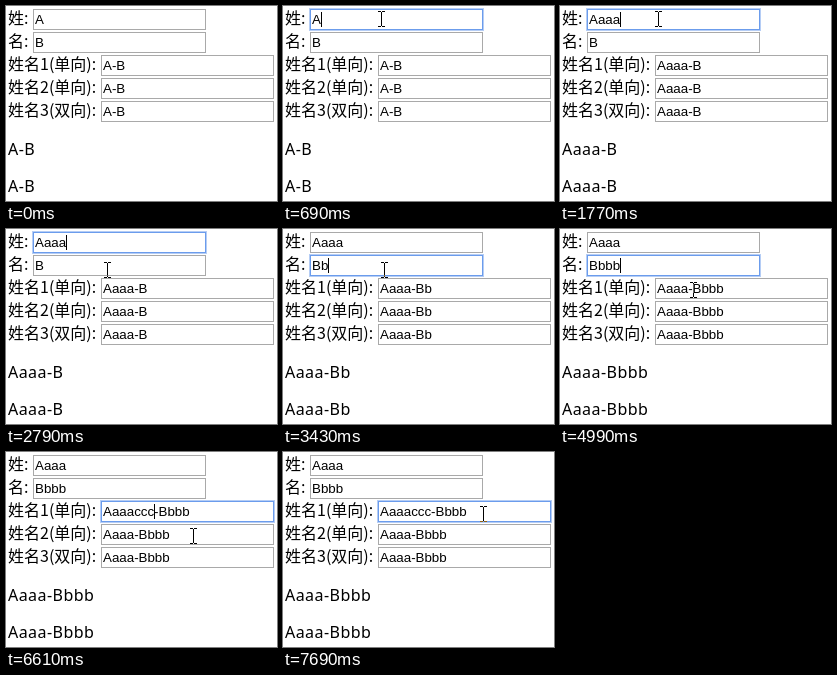
Write an HTML page with a canvas that moves like this. It is 271 px wide and 195 px high and loops after 8 s.

```html
<!DOCTYPE html>
<html lang="zh">
<head>
<meta charset="utf-8">
<title>姓名绑定</title>
<style>
html, body { margin: 0; width: 100%; height: 100%; overflow: hidden; background: #fff; }
canvas { display: block; }
</style>
</head>
<body>
<canvas id="stage" width="271" height="195"></canvas>
<script>
const ctx = document.getElementById('stage').getContext('2d', { alpha: false });
const LOOP = 8000;
const BLINK = 510;
const TICK = 78;
const LABEL_FONT = '16px "Noto Sans CJK SC", "Noto Sans CJK", sans-serif';
const BODY_FONT = '16px "Noto Sans", "Open Sans", sans-serif';
const INPUT_FONT = '13.333px "Liberation Sans", Arial, sans-serif';

const labels = ['姓:', '名:', '姓名1(单向):', '姓名2(单向):', '姓名3(双向):'];
const rows = labels.map((label, i) => ({ label, x: i < 2 ? 27 : 95, y: 3 + 23 * i }));

// Each session clicks into a row, then types one letter three times
const sessions = [
  { click: 690, type: 1240, gap: 265, letter: 'a' },
  { click: 2960, type: 3430, gap: 230, letter: 'b' },
  { click: 5380, type: 5690, gap: 235, letter: 'c' }
];
const END_CLICK = 7160;

// The pointer rests at each stop until the next one starts
const pointerStart = { x: 172, y: 133 };
const pointerStops = [
  { at: 70, steps: 5, x: 98, y: 5 },
  { at: 2480, steps: 3, x: 101, y: 33 },
  { at: 4200, steps: 3, x: 133, y: 53 },
  { at: 6140, steps: 6, x: 187, y: 76 },
  { at: 6612, steps: 4, x: 206, y: 49 },
  { at: 6925, steps: 3, x: 200, y: 54 }
];

const typedCount = (s, t) => Math.max(0, Math.min(3, Math.floor((t - s.type) / s.gap) + 1));
const typedText = (s, t) => s.letter.repeat(typedCount(s, t));

function write(text, x, y, font, spacing = 0) {
  ctx.font = font;
  ctx.letterSpacing = spacing + 'px';
  ctx.fillStyle = '#000';
  ctx.fillText(text, x, y);
}

function frame(x, y, w, h, color) {
  ctx.lineWidth = 1;
  ctx.strokeStyle = color;
  ctx.strokeRect(x + 0.5, y + 0.5, w - 1, h - 1);
}

function drawField({ label, x, y }, value, focused) {
  write(label, 2, y + 15, LABEL_FONT);
  if (focused) frame(x - 1, y - 1, 175, 23, '#b5cdf5');
  frame(x, y, 173, 21, focused ? '#6b9cec' : '#a9a9a9');
  write(value, x + 2, y + 15, INPUT_FONT);
}

function drawCaret(row, before) {
  ctx.font = INPUT_FONT;
  ctx.letterSpacing = '0px';
  const x = Math.round(row.x + 2 + ctx.measureText(before).width);
  ctx.fillStyle = '#000';
  ctx.fillRect(x, row.y + 3, 1, 15);
}

function caretVisible(focus, t) {
  const s = sessions[focus];
  const count = typedCount(s, t);
  let since = count ? s.type + (count - 1) * s.gap : s.click;
  if (t >= END_CLICK) since = END_CLICK;
  return Math.floor((t - since) / BLINK) % 2 === 0;
}

function drawArrow(x, y) {
  const points = [[0, 0], [0, 16], [4, 12.5], [6.5, 18], [9, 17], [6.5, 11.5], [11, 11.5]];
  ctx.beginPath();
  points.forEach(([px, py]) => ctx.lineTo(x + px + 0.5, y + py + 0.5));
  ctx.closePath();
  ctx.fillStyle = '#fff';
  ctx.fill();
  ctx.lineWidth = 1;
  ctx.strokeStyle = '#000';
  ctx.stroke();
}

// The text pointer inverts whatever lies below it
function drawBeam(x, y) {
  ctx.globalCompositeOperation = 'difference';
  ctx.fillStyle = '#fff';
  ctx.fillRect(x, y + 1, 1, 14);
  for (const edge of [y, y + 15]) {
    ctx.fillRect(x - 3, edge, 3, 1);
    ctx.fillRect(x + 1, edge, 3, 1);
  }
  ctx.globalCompositeOperation = 'source-over';
}

function drawPointer(t) {
  const i = pointerStops.filter(stop => t >= stop.at).length - 1;
  if (i < 0) return;
  const from = i ? pointerStops[i - 1] : pointerStart;
  const to = pointerStops[i];
  const k = Math.min(1, Math.floor((t - to.at) / TICK) / to.steps);
  const x = Math.round(from.x + (to.x - from.x) * k);
  const y = Math.round(from.y + (to.y - from.y) * k);
  (y > 116 ? drawArrow : drawBeam)(x, y);
}

function draw(t) {
  ctx.fillStyle = '#fff';
  ctx.fillRect(0, 0, 271, 195);

  const [a, b, c] = sessions.map(s => typedText(s, t));
  const first = 'A' + a;
  const last = 'B' + b;
  const full = first + '-' + last;
  const edited = first + c + '-' + last;
  const focus = sessions.filter(s => t >= s.click).length - 1;

  [first, last, edited, full, full].forEach((value, i) => drawField(rows[i], value, i === focus));
  for (const y of [149, 186]) write(full, 2, y, BODY_FONT, 0.45);

  if (focus >= 0 && caretVisible(focus, t)) {
    const before = [first, last, t < END_CLICK ? first + c : edited][focus];
    drawCaret(rows[focus], before);
  }
  drawPointer(t);
}

const begin = performance.now();
function tick() {
  draw((performance.now() - begin) % LOOP);
  requestAnimationFrame(tick);
}
tick();
</script>
</body>
</html>
```
